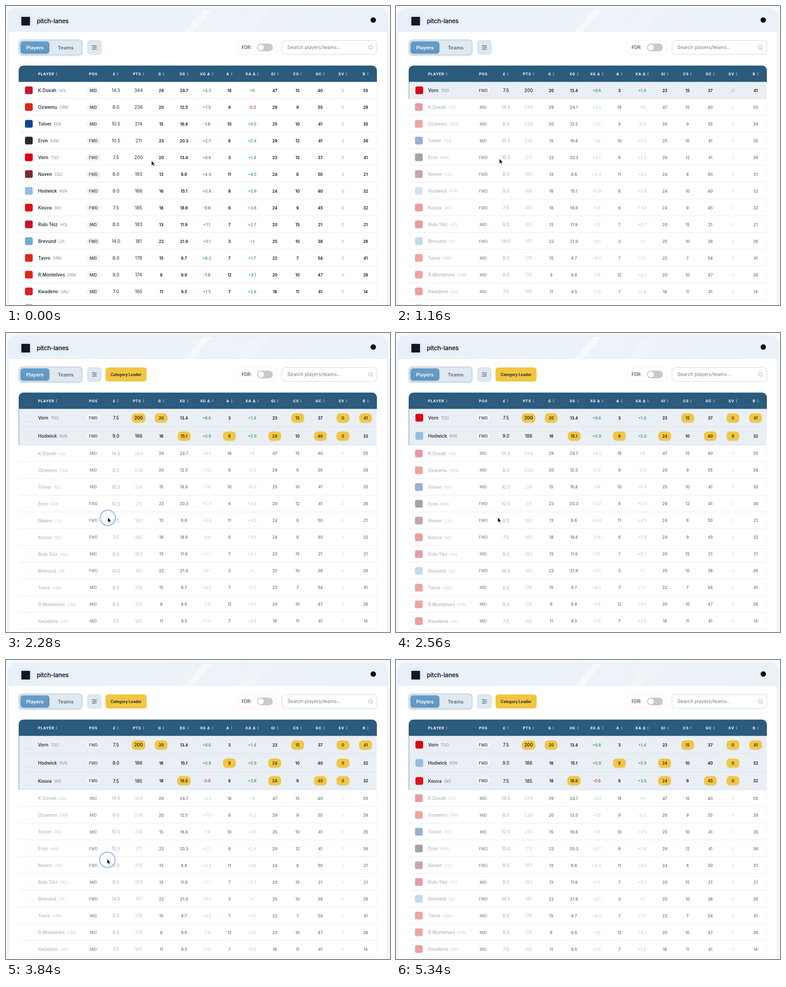
Write an HTML page that moves like this. It is 849x660 px and loops after 5400 ms.

```html
<!DOCTYPE html>
<html lang="en">
<head>
<meta charset="utf-8">
<title>pitch-lanes</title>
<style>
html, body { margin: 0; width: 100%; height: 100%; overflow: hidden; }
body { background: #f6f9fc; font-family: Inter, "Liberation Sans", sans-serif; }
#stage { position: absolute; left: 0; top: 0; width: 849px; height: 660px; overflow: hidden; }
#stage div, #stage svg.abs { position: absolute; box-sizing: border-box; white-space: nowrap; }
.mid { display: flex; align-items: center; justify-content: center; }

.card { left: 6px; top: 8px; width: 836px; height: 700px; border-radius: 14px; background: #fff;
  box-shadow: 0 0 4px rgba(120,150,185,.28); overflow: hidden; }
.top { left: 0; top: 0; width: 836px; height: 49px; border-bottom: 1px solid #e3ecf4;
  background: linear-gradient(90deg, #e8f1f9, #edf3f8 55%, #eaf1f7); }
.shine { top: 0; height: 49px; transform: skewX(-40deg); background: #fff; }
.brand { left: 68px; top: 23px; line-height: 20px; font-size: 13.4px; font-weight: 600;
  letter-spacing: -.02em; color: #16202e; }

.tabs { left: 28px; top: 74px; width: 141px; height: 35px; border-radius: 8px; background: #dfe9f1;
  border: 2px solid #c5d5e2; box-shadow: 0 1px 3px rgba(60,90,120,.18); }
.tab { font-size: 10.9px; font-weight: 600; color: #5a6a7b; height: 27px; top: 78px; }
.tab.on { color: #fff; border-radius: 6px; background: linear-gradient(#689dc8, #5f95c1);
  box-shadow: 0 1px 2px rgba(40,80,120,.25); }
.filter { left: 179.5px; top: 76px; width: 31px; height: 31px; border-radius: 6px; background: #dfe8f0;
  border: 1px solid #c6d4e0; }
#leader { left: 220px; top: 76px; width: 91px; height: 31px; border-radius: 6px; background: #f2c640;
  font-size: 8.4px; font-weight: 700; color: #27313d; }
.fdr { left: 512px; top: 76px; width: 87px; height: 31px; border-radius: 6px; border: 1px solid #eef1f4; }
.fdr-text { left: 521px; top: 82px; line-height: 19px; font-size: 9.8px; font-weight: 600; color: #536170; }
.switch { left: 555px; top: 83px; width: 35px; height: 17px; border-radius: 9px; background: #c9c9c9; }
.knob { left: 2px; top: 2px; width: 13px; height: 13px; border-radius: 50%; background: #fff; }
.search { left: 609.5px; top: 76px; width: 210px; height: 31px; border-radius: 8px; background: #fff;
  border: 1.5px solid #dbe2e9; box-shadow: 0 0 3px rgba(90,120,150,.22); }
.search-text { left: 622px; top: 82px; line-height: 19px; font-size: 10.65px; color: #747e8b; }

.head { left: 28px; top: 131px; width: 792px; height: 36px; border-radius: 11px 11px 0 0;
  background: #2b5b7d; transform: translateY(.5px); --line: 36px; }
.head .cell { font-size: 8px; font-weight: 700; letter-spacing: .8px; color: #fff; }
.head svg { margin-left: 3px; opacity: .6; flex: none; }

#body { left: 28px; top: 0; width: 793px; height: 660px; transform: translateY(.5px); }
.row { left: 0; width: 792px; border-bottom: 1px solid #e5e7eb; border-right: 1px solid #f4f5f7; }
.cell { width: 50px; top: 0; height: var(--line); }
.name { left: 43px; top: 0; line-height: var(--line); font-size: 9.85px; font-weight: 600; color: #2b3441; }
.name i { margin-left: 5.5px; font: 400 8.4px/1 Inter, "Liberation Sans", sans-serif; color: #858c97; }
.tile { left: 14px; top: calc(var(--line) / 2 - 8.5px); width: 17px; height: 17px; border-radius: 3.5px;
  box-shadow: 0 1px 2px rgba(0,0,0,.08); }
.fill { left: 0; top: 0; width: 17px; height: 17px; border-radius: 3.5px; }
.pos span { padding: 0 6px; height: 16px; line-height: 16px; border-radius: 8px; background: #f2f3f5;
  font-size: 8.4px; font-weight: 600; color: #465160; }
.big { font-size: 9.8px; font-weight: 500; color: #414b5a; }
.stat { font-size: 8.75px; font-weight: 600; color: #0c0f14; }
.up, .down { font-size: 8.75px; font-weight: 500; color: #2f9950; }
.down { color: #b8333f; }
.zero { font-size: 8.75px; color: #949ba6; }

.shift { left: 0; top: 0; width: 792px; height: 100%; }
.sel { background: #e9eff4; border-left: 1px solid #5b94c2; border-bottom-color: #d3dee7; }
.sel .shift { left: -1px; }
.sel .tile { left: 15px; }
.sel .big { color: #1d2632; }
.sel .pos span { background: #f3f5f7; box-shadow: 0 1px 2px rgba(0,0,0,.07); }
.best span { min-width: 28px; box-sizing: border-box; padding: 0 5.5px; height: 20px; line-height: 20px;
  border-radius: 8px; background: #f2c640; text-align: center; font-weight: 600; color: #222a35;
  box-shadow: 0 1px 2px rgba(120,100,20,.18); }

.dim .name { color: #b9bdc5; }
.dim .name i { color: #c8ccd2; }
.dim .tile { opacity: .42; }
.dim .pos span { background: none; color: #9197a0; }
.dim .big { color: #b4b8bf; }
.dim .pts { color: #cbced4; }
.dim .stat { color: #7c7e82; }
.dim .up { color: #b0d9be; }
.dim .down { color: #e9bbc0; }
.dim .zero { color: #d4d7db; }

#ring { border: 2px solid #8cb3ec; border-radius: 50%; background: rgba(255,255,255,.45); }
#cursor { left: 0; top: 0; overflow: visible; }
</style>
</head>
<body>
<div id="stage">
  <div class="card">
    <div class="top"></div>
    <div class="shine" style="left:410px;width:19px;opacity:.5"></div>
    <div class="shine" style="left:526px;width:34px;opacity:.12"></div>
  </div>
  <div style="left:33.5px;top:24px;width:19px;height:19px;background:#111821;box-shadow:0 0 8px rgba(60,80,110,.2)"></div>
  <div class="brand">pitch-lanes</div>
  <div style="left:805.5px;top:24.5px;width:12px;height:12px;border-radius:50%;background:#0b0d10"></div>

  <div class="tabs"></div>
  <div class="tab on mid" style="left:32px;width:64px">Players</div>
  <div class="tab mid" style="left:98px;width:68px">Teams</div>
  <div class="filter"></div>
  <svg class="abs" style="left:189px;top:85px" width="13" height="13" fill="#dfe8f0" stroke="#4f5f70" stroke-width="1">
    <path d="M1 2.8h11M1 6.5h11M1 10.2h11"/>
    <circle cx="4.5" cy="2.8" r="1.3"/><circle cx="8.7" cy="6.5" r="1.3"/><circle cx="5" cy="10.2" r="1.3"/>
  </svg>
  <div id="leader" class="mid">Category Leader</div>
  <div class="fdr"></div>
  <div class="fdr-text">FDR:</div>
  <div class="switch"><div class="knob"></div></div>
  <div class="search"></div>
  <div class="search-text">Search players/teams...</div>
  <svg class="abs" style="left:800px;top:86px" width="12" height="12" fill="none" stroke="#99a2ad">
    <circle cx="5.5" cy="5.2" r="4"/><path d="M8.4 8.2 10.6 10.4"/>
  </svg>

  <div id="body"></div>
  <div class="head" id="head"></div>
  <div id="ring"></div>
  <svg class="abs" id="cursor" width="9" height="14">
    <path d="M0 0V10.8L2.5 8.5 4.2 12.4 6 11.6 4.4 7.9H7.8Z" fill="#000" stroke="#fff" stroke-width=".8"/>
  </svg>
</div>
<script>
const LOOP = 5400;
const $ = id => document.getElementById(id);
const add = (parent, cls, html = '') => {
  const el = document.createElement('div');
  el.className = cls;
  el.innerHTML = html;
  parent.appendChild(el);
  return el;
};

const CLUBS = {
  HOL: '#c8142f', DRM: '#d92a1c', PEB: '#0e4594', KAW: '#26282a', TGO: '#dc0510',
  CSU: '#7c2a3d', RVN: '#92bfe3', SKE: '#dd1018', LDI: '#72a9dc', GAU: '#d42026'
};
// name | club | position | price, points, G, xG, xG diff, A, xA diff, CS, GC, B
const PLAYERS = `K.Dovah|HOL|MID|14.5 344 29 24.7 +4.3 18 +9 15 40 55
Ozwemu|DRM|MID|8.0 236 20 12.5 +7.5 9 -0.2 9 55 29
Tolver|PEB|MID|10.5 214 15 16.8 -1.8 10 +0.5 10 41 35
Eron|KAW|FWD|10.5 211 23 20.3 +2.7 6 +2.4 12 41 36
Vorn|TGO|FWD|7.5 200 20 13.4 +6.6 3 +1.4 15 37 41
Naven|CSU|FWD|8.0 193 13 8.6 +4.4 11 +4.5 8 50 21
Hodwick|RVN|FWD|9.0 186 16 15.1 +0.9 8 +5.9 10 40 32
Kouva|SKE|FWD|7.5 185 18 18.6 -0.6 6 +3.8 9 45 32
Rulo Téiz|HOL|MID|8.0 183 13 11.9 +1.1 7 +2.7 15 21 21
Brevund|LDI|FWD|14.0 181 22 21.9 +0.1 3 +1 10 38 26
Tavro|DRM|MID|8.0 178 15 8.7 +6.3 7 +1.7 7 54 41
R.Montelves|DRM|MID|9.0 174 8 9.9 -1.9 12 +4.1 10 47 28
Kwadeno|GAU|MID|7.0 165 11 9.5 +1.5 7 +2.6 11 41 14
|LDI|FWD|`.split('\n').map(line => {
  const [name, club, pos, nums] = line.split('|');
  const v = nums ? nums.split(' ') : [];
  if (v.length) {
    v.splice(7, 0, String(+v[2] + +v[5]));  // goal involvements = G + A
    v.splice(10, 0, '0');                   // saves
  }
  return { name, club, pos, v };
});

const HEADS = ['£', 'PTS', 'G', 'XG', 'XG Δ', 'A', 'XA Δ', 'GI', 'CS', 'GC', 'SV', 'B'];
const RANKED = [1, 2, 3, 5, 7, 8, 9, 10, 11];
const colX = i => 190 + i * 50.2;  // left edge of a 50px cell inside the table
const SORT = '<svg width="4" height="7" fill="none" stroke="#fff" stroke-width=".8"><path d="M2 .4v6.2M.5 2 2 .5 3.5 2M.5 5 2 6.5 3.5 5"/></svg>';

const label = (text, left) => {
  const el = add($('head'), 'cell mid', `<span>${text}</span>` + (text === 'POS' ? '' : SORT));
  el.style.left = left + 'px';
  return el;
};
label('PLAYER', 43).style.justifyContent = 'flex-start';
label('POS', 140);
HEADS.forEach((h, i) => label(h, colX(i)));

const kind = (i, s) => i < 2 ? (i ? 'big pts' : 'big')
  : i === 4 || i === 6 ? (s[0] === '-' ? 'down' : 'up')
  : i === 10 ? 'zero' : 'stat';

for (const p of PLAYERS) {
  p.row = add($('body'), 'row');
  const box = add(p.row, 'shift');
  p.fill = add(add(box, 'tile'), 'fill');
  p.fill.style.background = CLUBS[p.club];
  if (p.name) add(box, 'name', `${p.name}<i>${p.club}</i>`);
  add(box, 'cell mid pos', `<span>${p.pos}</span>`).style.left = '140px';
  p.cells = p.v.map((s, i) => {
    const el = add(box, 'cell mid ' + kind(i, s), `<span>${s}</span>`);
    el.style.left = colX(i) + 'px';
    return el;
  });
}

const PICKS = [4, 6, 7];
let shown = -1;
function layout(count) {
  if (count === shown) return;
  shown = count;
  const picked = PICKS.slice(0, count).map(i => PLAYERS[i]);
  const rest = PLAYERS.filter(p => !picked.includes(p));
  const best = i => Math.max(...picked.map(p => +p.v[i]));
  let y = 167;
  for (const p of [...picked, ...rest]) {
    const sel = picked.includes(p);
    const h = sel && count > 1 ? 39.8 : 37;
    p.row.className = 'row' + (sel ? ' sel' : count ? ' dim' : '');
    p.row.style.top = y + 'px';
    p.row.style.height = h + 'px';
    p.row.style.setProperty('--line', h + 'px');
    RANKED.forEach(i => p.cells[i] &&
      p.cells[i].classList.toggle('best', sel && count > 1 && +p.v[i] === best(i)));
    y += h;
  }
  $('leader').style.display = count > 1 ? '' : 'none';
}

// start, end, target x, target y
const START = [321.8, 341.6];
const MOVES = [[40, 340, 228.6, 337.2], [1160, 1700, 225, 407], [2940, 3380, 223.6, 439.3], [4880, 5320, 400, -20]];
const CLICKS = [540, 2120, 3640];
const clamp = x => Math.min(1, Math.max(0, x));
const ease = x => (1 - Math.cos(Math.PI * clamp(x))) / 2;

function pointer(t) {
  let [x, y] = START;
  for (const [a, b, tx, ty] of MOVES) {
    const k = ease((t - a) / (b - a));
    x += (tx - x) * k;
    y += (ty - y) * k;
  }
  return [x, y];
}

function draw(t) {
  layout(CLICKS.filter(c => t >= c + 100).length);

  const [x, y] = pointer(t);
  $('cursor').style.transform = `translate(${x}px,${y}px)`;

  const click = CLICKS.filter(c => t >= c - 20).pop();
  const age = click === undefined ? LOOP : t - click;
  const grow = clamp((age + 20) / 140);
  const r = 10.5 + 7.5 * grow;
  Object.assign($('ring').style, {
    left: x + .4 - r + 'px', top: y + 1.2 - r + 'px', width: 2 * r + 'px', height: 2 * r + 'px',
    opacity: grow * clamp((400 - age) / 160)
  });

  const load = age < 100 ? 1 : clamp((age - 220) / 140);
  PLAYERS.forEach(p => p.fill.style.opacity = load);
}

function tick() {
  draw(performance.now() % LOOP);
  requestAnimationFrame(tick);
}
tick();
</script>
</body>
</html>
```
